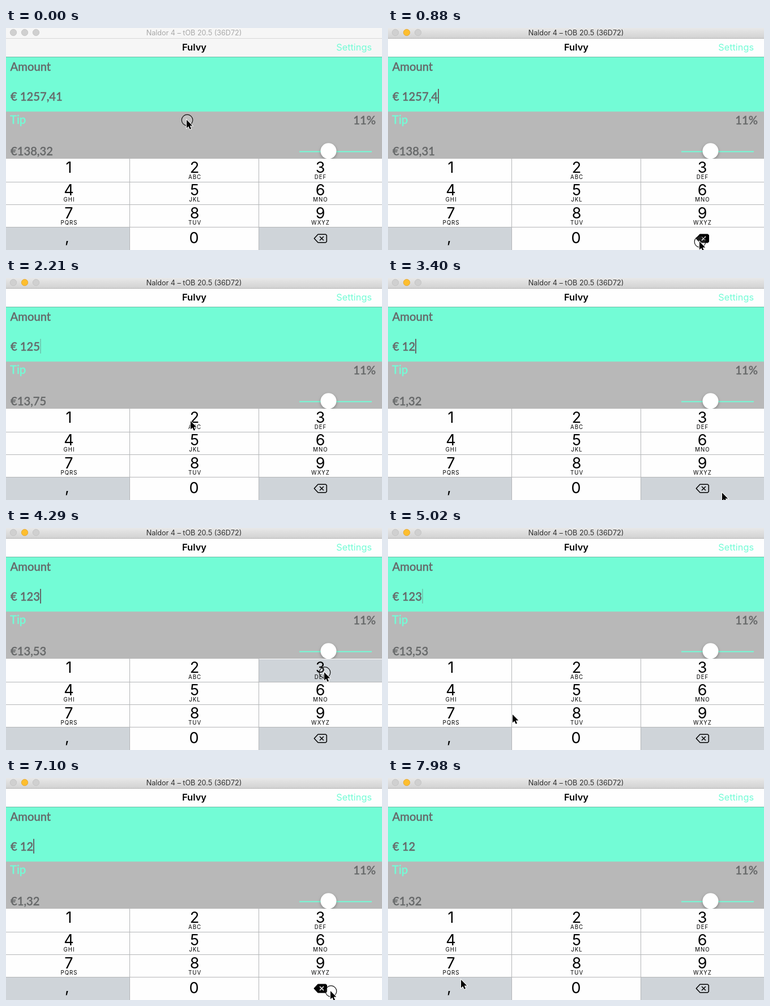
These frames come from a looping animation (664x394 px, 8 s). An HTML page with a canvas:

```html
<!DOCTYPE html>
<html lang="en">
<head>
<meta charset="utf-8">
<title>Tip calculator</title>
<style>
html, body { margin: 0; width: 100%; height: 100%; overflow: hidden; background: #fff; }
canvas { display: block; width: 664px; height: 394px; }
</style>
</head>
<body>
<canvas id="stage" width="664" height="394"></canvas>
<script>
const ctx = document.getElementById('stage').getContext('2d');
const LOOP = 8000, STEP = 147.9; // the screen refreshes once per step
const MINT = '#73fcd6', INK = '#666869', KEY_GRAY = '#cfd4d9', LINE = '#b4b6b8';
const UI = 'Inter, Roboto, sans-serif', ROUND = 'Lato, "Open Sans", sans-serif';

// Pointer trips: departure step, arrival step, destination.
const HOME = [319, 163];
const trips = [
  [0, 3, 550, 379], [12, 15, 326, 254], [16, 19, 556, 377], [22, 23, 590, 381],
  [25, 28, 562, 256], [31, 34, 220, 331], [34, 38, 127, 375],
  [43, 46, 573, 378], [51, 54, 129, 358]
];
// Keys tapped: step, key ('<' deletes).
const taps = [[5, '<'], [7, '<'], [8, '<'], [10, '<'], [21, '<'], [29, '3'], [47, '<']];
const subs = ['', 'ABC', 'DEF', 'GHI', 'JKL', 'MNO', 'PQRS', 'TUV', 'WXYZ'];
const COLS = [0, 219, 447, 664];

const clamp = v => Math.min(1, Math.max(0, v));
const ease = p => p * p * (3 - 2 * p);

function pointerAt(n) {
  return trips.reduce(([x, y], [from, to, tx, ty]) => {
    const p = ease(clamp((n - from) / (to - from)));
    return [x + (tx - x) * p, y + (ty - y) * p];
  }, HOME);
}

// Solid after each edit, then blinking with a short fade.
function caretAt(n, lastEdit) {
  const phase = (n - lastEdit) % 8;
  return clamp(1 - .7 * (phase - 4));
}

function amountAt(done) {
  return done.reduce((text, [, key]) => {
    if (key !== '<') return text + key;
    return text.slice(0, -1);
  }, '1257,41');
}

function tipOf(amount) {
  const value = parseFloat(amount.replace(',', '.'));
  return (Math.round(value * 11 + 1e-6) / 100).toFixed(2).replace('.', ',');
}

function rect(x, y, w, h, fill) {
  ctx.fillStyle = fill;
  ctx.fillRect(x, y, w, h);
}

function disc(x, y, r, fill, stroke, width = 1) {
  ctx.beginPath();
  ctx.arc(x, y, r, 0, Math.PI * 2);
  ctx.fillStyle = fill;
  ctx.fill();
  if (stroke) {
    ctx.strokeStyle = stroke;
    ctx.lineWidth = width;
    ctx.stroke();
  }
}

function label(text, x, y, font, color, align = 'left') {
  ctx.font = font;
  ctx.fillStyle = color;
  ctx.textAlign = align;
  ctx.fillText(text, x, y);
}

// Panel text, slightly thickened to a medium weight.
function panelText(text, x, y, color = INK, align = 'left') {
  label(text, x, y, '500 20.2px ' + ROUND, color, align);
  ctx.strokeStyle = color;
  ctx.lineWidth = .4;
  ctx.strokeText(text, x, y);
  return x + ctx.measureText(text).width;
}

function poly(points) {
  ctx.beginPath();
  points.forEach(([x, y]) => ctx.lineTo(x, y));
  ctx.closePath();
}

function drawBars(active) {
  const bar = ctx.createLinearGradient(0, 0, 0, 18);
  bar.addColorStop(0, active ? '#e8e8e8' : '#f6f6f6');
  bar.addColorStop(1, active ? '#d2d2d2' : '#f6f6f6');
  rect(0, 0, 664, 18, bar);
  rect(0, 18, 664, 1, active ? '#b5b5b5' : '#d8d8d8');
  for (let i = 0; i < 3; i++) {
    const lit = active && i === 1;
    disc(13 + 20 * i, 8, 5.7, lit ? '#fdbe2e' : '#d0d0d0', lit ? '#e0a32a' : '#c0c0c0', .8);
  }
  label('Naldor 4 – tOB 20.5 (36D72)', 332, 13, '12.6px ' + UI, active ? '#2e2e2e' : '#a8a8a8', 'center');

  rect(0, 19, 664, 32, active ? '#fefefe' : '#f6f6f6');
  rect(0, 51, 664, 1, '#6cbda6');
  label('Fulvy', 332.5, 40, '600 16.5px ' + UI, '#000', 'center');
  label('Settings', 646, 40, '16.3px ' + UI, MINT, 'right');
}

function drawPanels(amount, caret) {
  rect(0, 52, 664, 96, MINT);
  rect(0, 148, 664, 1, '#9fcfc1');
  rect(0, 149, 664, 83, '#b8b8b8');
  panelText('Amount', 7.5, 76);
  const end = panelText('€ ' + amount, 8, 129);
  ctx.globalAlpha = caret;
  rect(Math.round(end), 108, 2, 26, INK);
  ctx.globalAlpha = 1;
  panelText('Tip', 7, 169.5, MINT);
  panelText('11%', 653, 170.5, INK, 'right');
  panelText('€' + tipOf(amount), 8, 226);

  rect(518, 218.4, 128, 2, MINT);
  ctx.save();
  ctx.shadowColor = 'rgba(0,0,0,.3)';
  ctx.shadowBlur = 5;
  ctx.shadowOffsetY = 2;
  disc(569.5, 218.3, 14, '#fff');
  ctx.restore();
}

function drawDelete(pressed) {
  poly([[544.3, 373.5], [551, 366.2], [564.5, 366.2], [566.3, 368], [566.3, 379], [564.5, 380.8], [551, 380.8]]);
  ctx.lineJoin = 'round';
  ctx.lineWidth = 1.5;
  ctx.strokeStyle = ctx.fillStyle = '#000';
  if (pressed) ctx.fill();
  ctx.stroke();
  ctx.beginPath();
  ctx.moveTo(554, 370); ctx.lineTo(561, 377);
  ctx.moveTo(561, 370); ctx.lineTo(554, 377);
  ctx.strokeStyle = pressed ? '#fff' : '#000';
  ctx.stroke();
}

function drawKeypad(pressed) {
  const digitFont = '27px ' + UI;
  rect(0, 232, 664, 162, '#fefefe');
  rect(0, 354, 218, 40, KEY_GRAY);
  if (pressed !== '<') rect(447, 354, 217, 40, KEY_GRAY);
  subs.forEach((sub, i) => {
    const c = i % 3, row = Math.floor(i / 3), digit = String(i + 1);
    const x = 111 + c * 222, y = 256.5 + row * 40.5;
    if (pressed === digit) rect(COLS[c], 233 + row * 40, COLS[c + 1] - COLS[c], 40, KEY_GRAY);
    label(digit, x, y, digitFont, '#000', 'center');
    ctx.letterSpacing = '1px';
    label(sub, x + .5, y + 11, '9.7px ' + UI, '#000', 'center');
    ctx.letterSpacing = '0px';
  });
  for (let i = 1; i < 4; i++) rect(0, 233 + 40 * i, 664, 1, LINE);
  for (const x of COLS.slice(1, 3)) rect(x - 1, 232, 1, 162, LINE);
  label(',', 108, 381, digitFont, '#000', 'center');
  label('0', 332, 381.5, digitFont, '#000', 'center');
  drawDelete(pressed === '<');
}

function drawPointer(x, y, down) {
  if (down) disc(x + 1, y + .5, 9.8, 'rgba(255,255,255,.12)', '#111', 1.2);
  ctx.save();
  ctx.translate(x, y);
  poly([[0, 0], [0, 14.5], [3.3, 11.4], [5.7, 16.8], [8, 15.8], [5.7, 10.6], [10.3, 10.4]]);
  ctx.lineJoin = 'miter';
  ctx.lineWidth = 1.8;
  ctx.strokeStyle = '#fff';
  ctx.stroke();
  ctx.fillStyle = '#000';
  ctx.fill();
  ctx.restore();
}

function draw(ms) {
  const n = Math.floor((ms % LOOP + 10) / STEP);
  const done = taps.filter(([at]) => at <= n);
  const [lastEdit, key] = done[done.length - 1] || [-6, ''];
  const held = n === 0 || n - lastEdit < 2 && key !== '';
  const [x, y] = pointerAt(n);
  drawBars(done.length > 0);
  drawPanels(amountAt(done), caretAt(n, lastEdit));
  drawKeypad(held ? key : '');
  drawPointer(x, y, held);
}

const start = performance.now();
function tick() {
  draw(performance.now() - start);
  requestAnimationFrame(tick);
}
tick();
</script>
</body>
</html>
```
